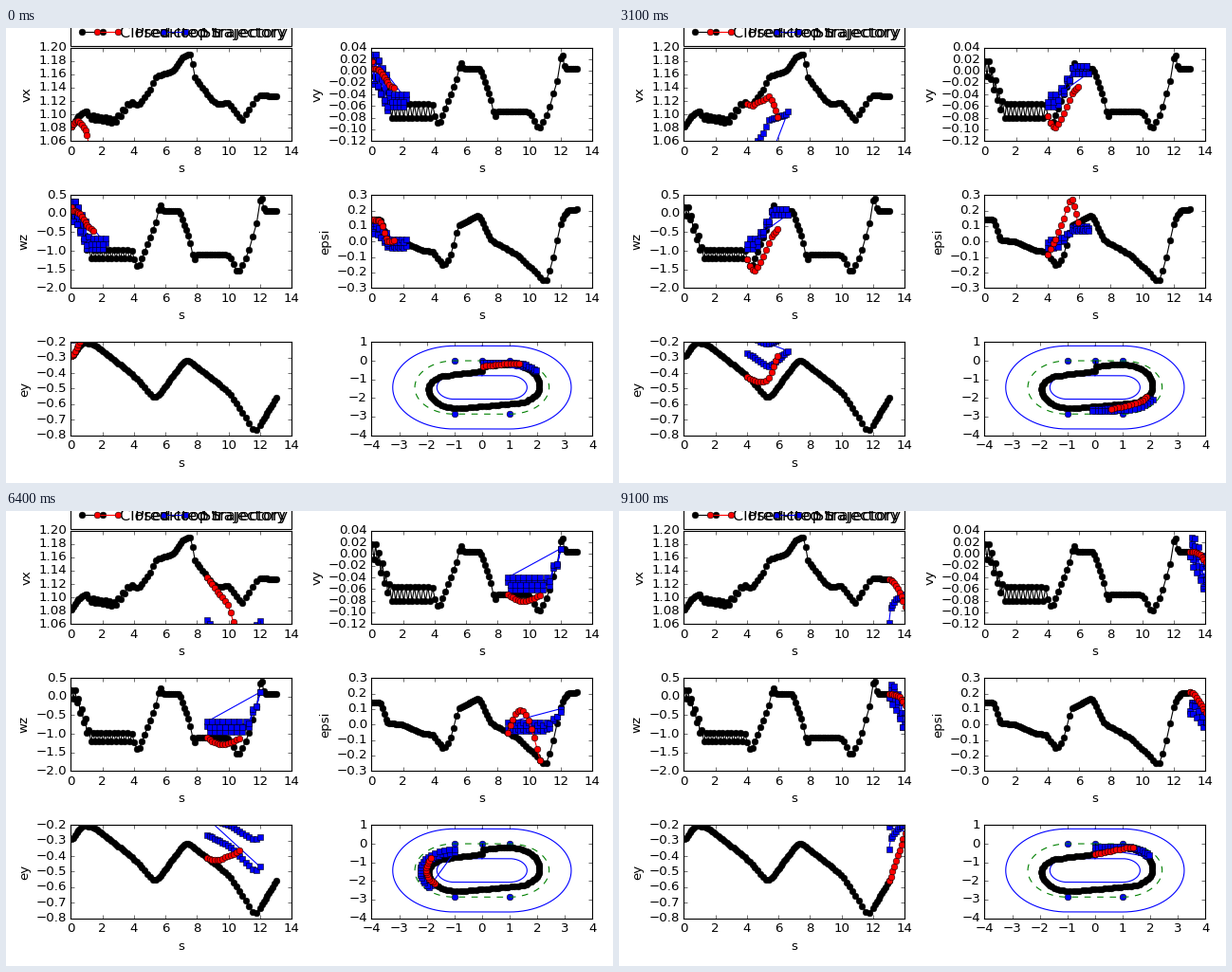
A matplotlib script that plays this animation: 640x480 px, repeating every 9.2 s.

```python
import numpy as np
import matplotlib.pyplot as plt
from matplotlib.animation import FuncAnimation

plt.style.use("classic")
plt.rcParams.update({"figure.dpi": 80, "savefig.dpi": 80, "figure.facecolor": "w",
                     "font.family": "DejaVu Sans", "axes.formatter.useoffset": False})

FRAMES, HORIZON, SAFE_POINTS = 92, 12, 19
LAP, RADIUS, HALF_WIDTH = 13.0, 4.5 / np.pi, 0.8
VY_PER_WZ = .063


def rounded(width, *points):
    """Polyline through key points with its corners averaged over +-width."""
    s, v = np.array(points).T
    shifts = np.linspace(-width, width, 7)
    return lambda x: np.mean([np.interp(x + d, s, v) for d in shifts], axis=0)


def bump(s, centre, height, width):
    return height * np.exp(-((s - centre) / width) ** 2)


def turning(s):
    """0 on the straights, 1 in the bends, with ramps between."""
    return np.interp(s, [.3, 1.2, 4.6, 5.65, 6.9, 7.8, 11.2, 12, 13.3, 14.5],
                     [0, 1, 1, 0, 0, 1, 1, 0, 0, 1])


def yaw_rate(s):
    return (.06 - 1.15 * turning(s) + bump(s, 4.25, -.33, .25) + bump(s, 5.65, .18, .12)
            + bump(s, 7.8, -.28, .08) + bump(s, 10.6, -.47, .4) + bump(s, 12.07, .4, .12))


# The closed loop as functions of arc length.
STATE = {
    "vx": rounded(.03, (0, 1.08), (.4, 1.096), (1, 1.106), (1.2, 1.096), (2.8, 1.09),
                  (3.7, 1.117), (4.3, 1.114), (5, 1.136), (5.4, 1.157), (6.5, 1.165),
                  (7.1, 1.187), (7.68, 1.191), (7.76, 1.159), (8.9, 1.122), (9.3, 1.116),
                  (10, 1.117), (10.85, 1.091), (11.9, 1.129), (13, 1.127), (14.5, 1.12)),
    "vy": lambda s: VY_PER_WZ * yaw_rate(s),
    "wz": yaw_rate,
    "epsi": rounded(.1, (0, .143), (.6, .145), (.95, .01), (2, 0), (3.3, -.06), (3.9, -.065),
                    (4.55, -.16), (5, -.1), (5.5, .1), (6.8, .172), (7.55, .01),
                    (9.3, -.09), (11.05, -.265), (11.45, -.138), (12.05, .14), (12.4, .2),
                    (13.3, .21), (14.5, 0)),
    "ey": rounded(.2, (0, -.305), (.7, -.2), (1.5, -.215), (4, -.417), (5.35, -.57),
                  (7.3, -.305), (10, -.52), (11.7, -.785), (13, -.56), (14.5, -.25)),
}
ZIGZAG = {"vx": .003, "vy": .0125, "wz": .12, "epsi": 0, "ey": 0}


def arc_lengths(count, start=.05):
    s = [start]
    while len(s) < count:
        p = s[-1] % LAP
        bend = 1 < p < 5.5 or 7.5 < p < 12
        shrink = 1 + STATE["ey"](s[-1]) / RADIUS if bend else 1
        s.append(s[-1] + .1 * STATE["vx"](s[-1]) / shrink)
    s = np.array(s)
    return start + (s - start) * (LAP - start) / (s[FRAMES - 1] - start)


S = arc_lengths(FRAMES + SAFE_POINTS)


def to_xy(s, ey):
    s = np.asarray(s) % LAP
    r = RADIUS + ey
    a, b = (s - 1) / RADIUS, (s - 7.5) / RADIUS
    parts = [s < 1, s < 5.5, s < 7.5, s < 12]
    x = np.select(parts, [s, 1 + r * np.sin(a), 6.5 - s, -1 - r * np.sin(b)], s - LAP)
    y = np.select(parts, [ey + 0 * s, -RADIUS + r * np.cos(a), -RADIUS - r,
                          -RADIUS - r * np.cos(b)], ey + 0 * s)
    return x, y


def current_lap(s, sign):
    return {name: f(s) + sign * ZIGZAG[name] * ((s < 3.95) & ((s > 1.2) | (name != "vx")))
            for name, f in STATE.items()}


def past_lap(age, s, sign):
    """Earlier laps are slower, turn less and stay nearer the centre line."""
    wobble = sign * np.where(s < 1.1, .27, .07)
    bend = turning(s)
    wz = .05 - (1.05 - .13 * age) * bend + wobble
    return {"vx": STATE["vx"](s) + .04 - .105 * age,
            "vy": VY_PER_WZ * wz + .03 * wobble,
            "wz": wz,
            "epsi": (.19 - .06 * age) * (1 - bend) - .075 + .04 * age + .1 * wobble,
            "ey": (.9 - .26 * age) * STATE["ey"](s)}


def safe_set(step):
    """The two last laps ahead of the car, running on into the lap that followed."""
    index = np.arange(step, step + SAFE_POINTS)
    s, sign = S[index], (-1.0) ** index
    laps = [current_lap(s - LAP, sign)]
    values = {name: [] for name in STATE}
    for age in (1, 2):
        lap = past_lap(age, s, sign)
        following = laps[-1]
        for name in STATE:
            values[name].append(np.where(s < LAP, lap[name], following[name]))
        laps.append(past_lap(age, s - LAP, sign))
    return np.tile(s, 2), {name: np.concatenate(v) for name, v in values.items()}


def prediction(step):
    """The plan brakes, leaves bends late and drifts back to the centre line."""
    s = S[step:step + HORIZON + 1]
    u = np.linspace(0, 1, HORIZON + 1)
    hump = np.sin(np.pi * u)
    wz = yaw_rate(np.maximum(s - .7 * u, s[0])) - .2 * hump * turning(s)
    values = {"vx": STATE["vx"](s) - .065 * u ** 2,
              "vy": VY_PER_WZ * wz,
              "wz": wz,
              "epsi": STATE["epsi"](s) - .19 * yaw_rate(s[0]) * hump,
              "ey": STATE["ey"](s) * (1 - .42 * u ** 1.5)}
    for name in STATE:
        values[name][0] = closed[name][step]
    return s, values


lap_s = S[:FRAMES]
closed = current_lap(lap_s, (-1.0) ** np.arange(FRAMES))

fig = plt.figure(figsize=(8, 6))


def panel(row, col, xlim, ylim, xstep, ystep):
    left, top = (68.4, 385.4)[col], 20.9 + 155.25 * row
    ax = fig.add_axes([left / 640, 1 - (top + 98.2) / 480, 232.9 / 640, 98.2 / 480])
    ax.set_xticks(np.arange(xlim[0], xlim[1] + 1, xstep))
    count = round((ylim[1] - ylim[0]) / ystep) + 1
    ax.set_yticks(np.round(np.linspace(*ylim, count), 2) + 0.0)
    ax.set_xlim(xlim)
    ax.set_ylim(ylim)
    return ax


def moving_lines(ax):
    safe, = ax.plot([], [], "-sb", label="SS")
    ahead, = ax.plot([], [], "-or", label="Predicted trajectory")
    return safe, ahead


PANELS = [("vx", (1.06, 1.2), .02), ("vy", (-.12, .04), .02), ("wz", (-2, .5), .5),
          ("epsi", (-.3, .3), .1), ("ey", (-.8, -.2), .1)]
lines = {}
for i, (name, ylim, ystep) in enumerate(PANELS):
    ax = panel(i // 2, i % 2, (0, 14), ylim, 2, ystep)
    ax.set_xlabel("s")
    ax.set_ylabel(name)
    ax.plot(lap_s, closed[name], "-ok", label="Closed-loop trajectory")
    lines[name] = moving_lines(ax)
    if name == "vx":
        ax.legend(bbox_to_anchor=(0, 1.02, 1, .102), loc="lower left", ncol=3,
                  mode="expand", borderaxespad=0)

track = panel(2, 1, (-4, 4), (-4, 1), 1, 1)
along = np.linspace(0, LAP - 1e-6, 600)
corners = np.array([0, 1, 5.5, 7.5, 12])
track.plot(*to_xy(corners, 0), "ob")
track.plot(*to_xy(along, 0), "--g")
for side in (-HALF_WIDTH, HALF_WIDTH):
    track.plot(*to_xy(along, side), "-b")
track.plot(*to_xy(lap_s, closed["ey"]), "-ok")
track.plot([0, 0], [0, closed["ey"][-1]], "-k")
lines["track"] = moving_lines(track)


def draw(step):
    for which, (s, values) in enumerate((safe_set(step), prediction(step))):
        for name in STATE:
            lines[name][which].set_data(s, values[name])
        lines["track"][which].set_data(*to_xy(s, values["ey"]))
    return [line for pair in lines.values() for line in pair]


anim = FuncAnimation(fig, draw, frames=FRAMES, interval=100, repeat=True, repeat_delay=0)
plt.show()
```
